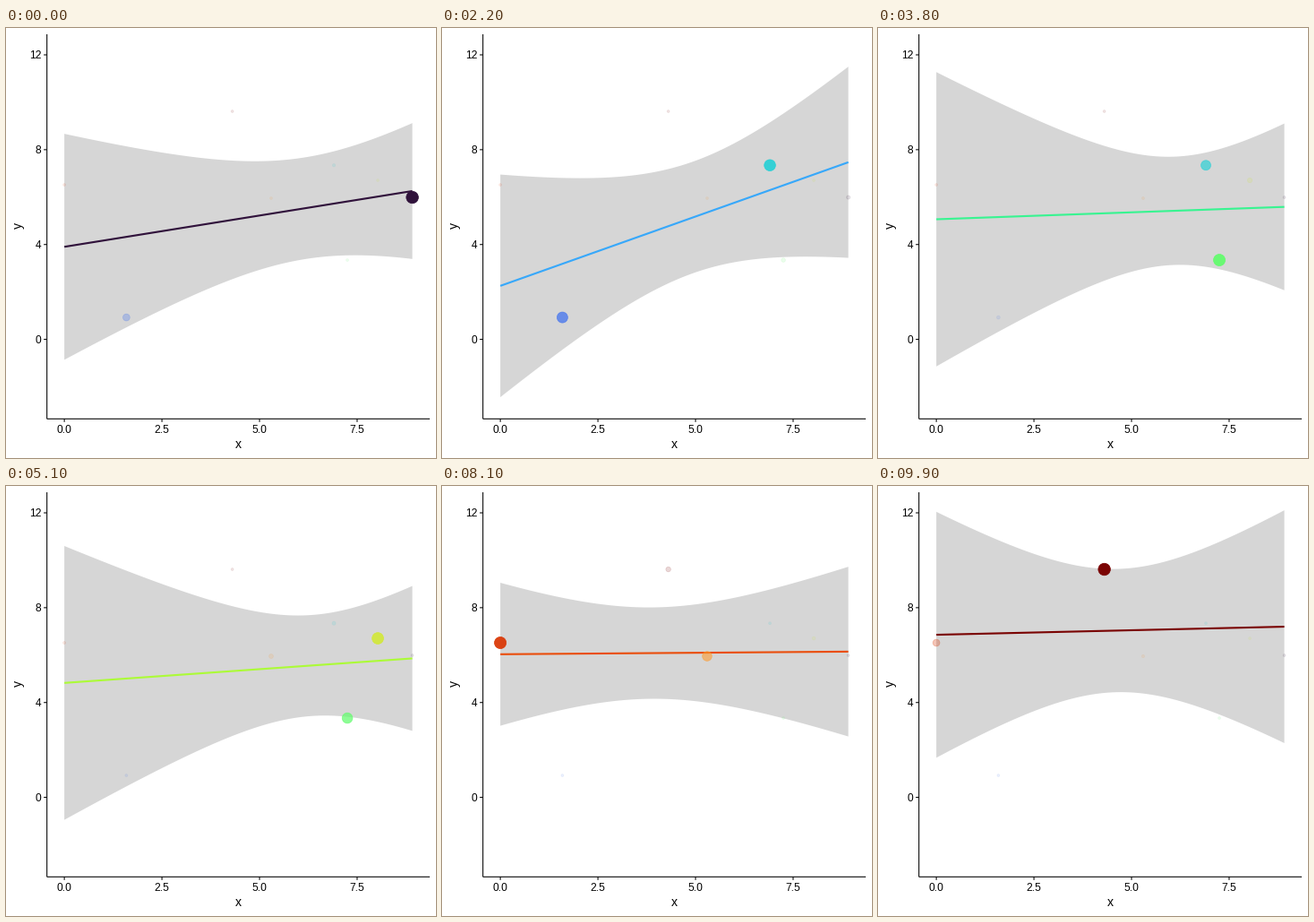
A matplotlib script for the animation above (10 s loop, 480 by 480 pixels).

```python
import numpy as np
import matplotlib.pyplot as plt
from matplotlib.animation import FuncAnimation
from matplotlib.patches import Polygon

SIZE, DPI = 480, 72          # at 72 dpi one point is one pixel
FRAMES, INTERVAL = 100, 100
T_CRIT = 2.4469              # 97.5 % quantile of Student's t, 6 df
REACH, SOFT = 0.745, 0.195   # half-height distance and softness of the kernel

plt.rcParams["font.family"] = "Liberation Sans"

# Observations in the order in which the focus visits them
x = np.array([8.914, 1.589, 6.905, 7.25, 8.03, 5.297, 0.0, 4.303])
y = np.array([5.99, 0.926, 7.343, 3.345, 6.708, 5.953, 6.52, 9.618])
order = np.arange(len(x))
last = len(x) - 1
turbo = plt.get_cmap("turbo")
grid = np.linspace(x.min(), x.max(), 80)


def kernel(t):
    """Closeness of every observation to focus time t, from 0 to 1."""
    dist = np.abs(order - t)
    return (1 + np.exp(-REACH / SOFT)) / (1 + np.exp((dist - REACH) / SOFT))


def weighted_fit(w):
    """Weighted line on the grid and the half-width of its 95 % band."""
    total = w.sum()
    mx, my = w @ x / total, w @ y / total
    sxx = w @ (x - mx) ** 2
    slope = w @ ((x - mx) * (y - my)) / sxx
    resid = y - my - slope * (x - mx)
    var = w @ resid ** 2 / (len(x) - 2)
    se = np.sqrt(var * (1 / total + (grid - mx) ** 2 / sxx))
    return my + slope * (grid - mx), T_CRIT * se


def marker_areas(k):
    size = 1 + 5 * np.sqrt(k)
    return (0.75 * (2.845 * size + 0.94)) ** 2


fig = plt.figure(figsize=(SIZE / DPI, SIZE / DPI), dpi=DPI, facecolor="white")
left, right, top, bottom = 45.7, 473, 7, 436.3
width, height = right - left, bottom - top
ax = fig.add_axes([left / SIZE, 1 - bottom / SIZE, width / SIZE, height / SIZE])
pad = 0.05 * x.max()
ax.set_xlim(-pad, x.max() + pad)
ax.set_ylim(-3.352, 12.868)
xticks, yticks = [0, 2.5, 5, 7.5], [0, 4, 8, 12]
ax.set_xticks(xticks, ["0.0", "2.5", "5.0", "7.5"])
ax.set_yticks(yticks)
ax.tick_params(length=0, labelsize=12)
ax.tick_params(axis="x", pad=7)
ax.tick_params(axis="y", pad=6.3)
ax.spines[:].set_visible(False)


def rule(xs, ys, transform):
    """Thin black axis line, kept off the pixel grid."""
    ax.plot(xs, ys, color="black", lw=1.07, solid_capstyle="butt",
            transform=transform, clip_on=False, snap=False)


TICK = 3.5
rule([0, 1], [0, 0], ax.transAxes)
rule([0, 0], [0, 1], ax.transAxes)
for v in xticks:
    rule([v, v], [0, -TICK / height], ax.get_xaxis_transform())
for v in yticks:
    rule([0, -TICK / width], [v, v], ax.get_yaxis_transform())

fig.text(259.3 / SIZE, 1 - 469 / SIZE, "x", size=14, ha="center", va="baseline")
fig.text(20.5 / SIZE, 1 - 220.8 / SIZE, "y", size=14, rotation=90,
         ha="right", va="center")

band = ax.add_patch(Polygon(np.zeros((3, 2)), facecolor="#D6D6D6",
                            linewidth=0, zorder=1))
line, = ax.plot([], [], lw=2.13, solid_capstyle="butt", zorder=2.5)
dots = ax.scatter(x, y, linewidths=0.71, zorder=3, clip_on=False)


def update(i):
    t = last * i / (FRAMES - 1)
    k = kernel(t)
    fit, half = weighted_fit(1 + 4 * k)

    upper = np.column_stack([grid, fit + half])
    lower = np.column_stack([grid, fit - half])
    band.set_xy(np.vstack([upper, lower[::-1]]))
    line.set_data(grid, fit)
    line.set_color(turbo(t / last))

    colors = turbo(order / last)
    colors[:, 3] = 0.1 + 0.9 * k
    dots.set_facecolor(colors)
    dots.set_edgecolor(colors)
    dots.set_sizes(marker_areas(k))
    return band, line, dots


anim = FuncAnimation(fig, update, frames=FRAMES, interval=INTERVAL,
                     init_func=lambda: update(0), repeat=True, repeat_delay=0)
plt.show()
```
